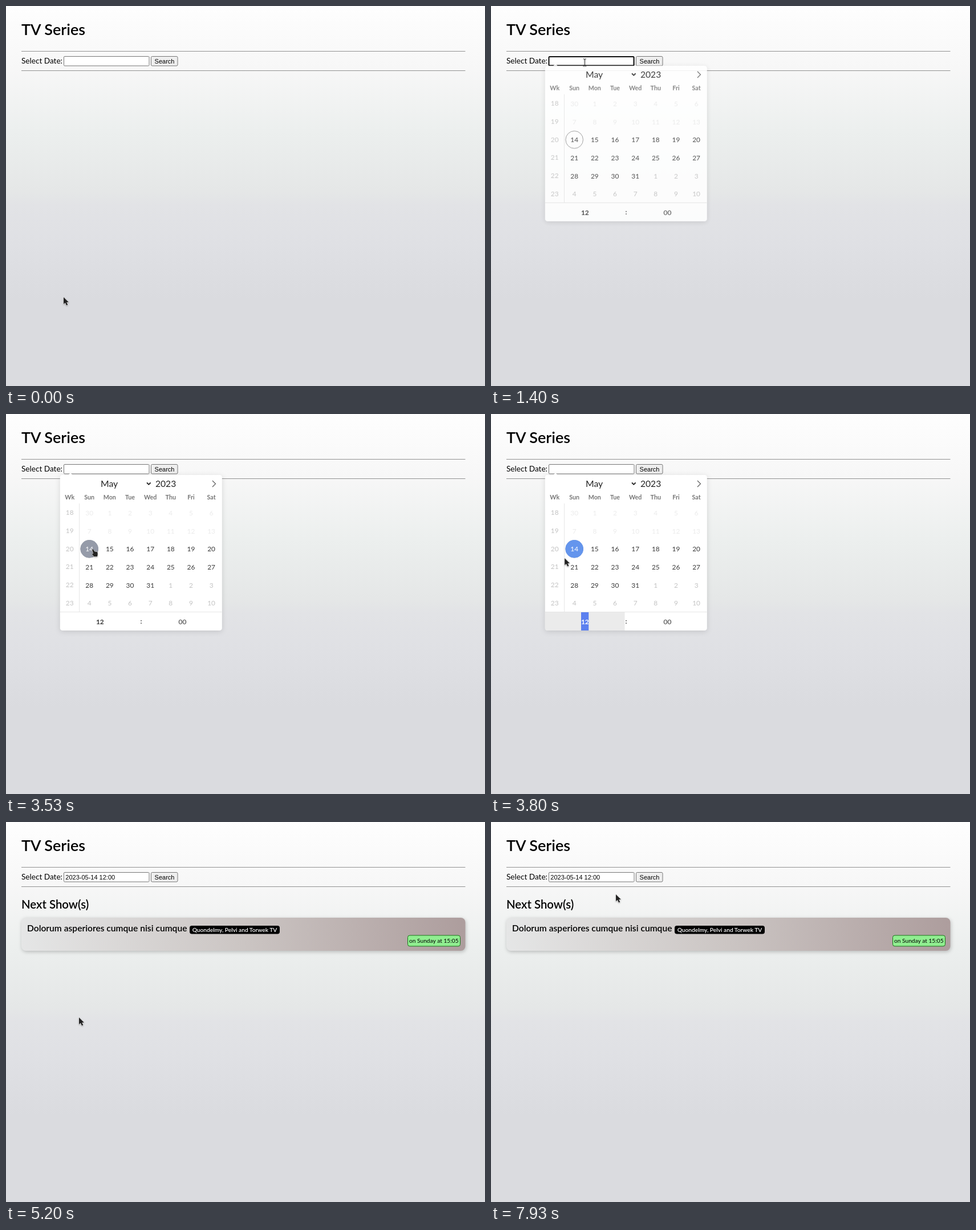
Recreate the animation shown at these times as an HTML page. Size 840 px wide and 667 px high, loop 8000 ms.

```html
<!DOCTYPE html>
<html lang="en">
<head>
<meta charset="utf-8">
<title>TV Series</title>
<style>
html, body { margin: 0; width: 100%; height: 100%; overflow: hidden; }
body {
  background: linear-gradient(#fefefe 0, #f7f7f7 110px, #ecefee 220px, #e5e7e7 325px,
    #e2e3e6 350px, #dfe0e4 420px, #dadbdf 515px, #dadbdf 667px);
}
svg { display: block; width: 840px; height: 667px; user-select: none; }
text { font-family: Lato, sans-serif; font-size: 11.9px; }
.semi { font-weight: 600; }
.mid { text-anchor: middle; }
.field { font-family: "Liberation Sans", Arial, sans-serif; font-size: 11px; }
.small { font-size: 10.2px; }
.week { fill: rgba(57, 57, 57, .3); }
.name { fill: rgba(0, 0, 0, .54); font-size: 10.7px; font-weight: 700; }
.day { fill: #393939; }
.off { fill: rgba(57, 57, 57, .1); }
.next { fill: rgba(57, 57, 57, .3); }
.card { filter: drop-shadow(1px 2px 3px rgba(0, 0, 0, .22)); }
.sheet { filter: drop-shadow(0 2px 5px rgba(0, 0, 0, .13)); }

/* 1% of the loop is 80 ms */
.anim { animation: 8s step-end infinite; }
#popup { animation-name: popup; }
#ring { animation-name: ring; }
#month { animation-name: month; }
#hover { animation-name: hover; }
#picked { animation-name: picked; }
#hour { animation-name: hour; }
#results { animation-name: results; }
#value { animation-name: value; }
#arrow { animation-name: arrow; }
#beam { animation-name: beam; }
#hand { animation-name: hand; }
#cursor { animation: move 8s linear infinite; }

@keyframes popup {
  0% { opacity: 0; transform: translateY(-17px); }
  16.3% { opacity: 0; transform: translateY(-17px); animation-timing-function: cubic-bezier(.23, 1, .32, 1); }
  20% { opacity: 1; transform: none; }
  59.125%, 100% { opacity: 0; transform: none; }
}
@keyframes ring { 0%, 25%, 100% { opacity: 0; } 16.3% { opacity: 1; } }
@keyframes month { 0%, 25%, 100% { opacity: 0; } 22% { opacity: 1; } }
@keyframes hover { 0%, 45%, 100% { opacity: 0; } 27.4% { opacity: 1; } }
@keyframes picked { 0%, 100% { opacity: 0; } 45% { opacity: 1; } }
@keyframes hour { 0%, 100% { opacity: 0; } 45.8% { opacity: 1; } }
@keyframes results { 0%, 100% { opacity: 0; } 48% { opacity: 1; } }
@keyframes value { 0%, 100% { opacity: 0; } 59.125% { opacity: 1; } }
@keyframes arrow { 0%, 25%, 46.5%, 100% { opacity: 1; } 11.6%, 26.6% { opacity: 0; } }
@keyframes beam { 0%, 20.8%, 100% { opacity: 0; } 11.6% { opacity: 1; } }
@keyframes hand { 0%, 25%, 46.5%, 100% { opacity: 0; } 20.8%, 26.6% { opacity: 1; } }
@keyframes move {
  0%, .9% { transform: translate(101px, 511px); }
  2.5% { transform: translate(80px, 390px); animation-timing-function: ease-out; }
  4.125%, 5.8% { transform: translate(98px, 244px); animation-timing-function: ease-out; }
  10% { transform: translate(165px, 112px); animation-timing-function: ease-out; }
  14.125%, 17% { transform: translate(164px, 97px); }
  24.125% { transform: translate(169px, 126px); }
  26.625% { transform: translate(155px, 226px); animation-timing-function: ease-out; }
  34.125%, 44.2% { transform: translate(151px, 237px); animation-timing-function: ease-in-out; }
  54.125%, 59.2% { transform: translate(57px, 306px); animation-timing-function: ease-in-out; }
  65%, 66% { transform: translate(128px, 343px); animation-timing-function: ease-in-out; }
  76.625% { transform: translate(711px, 266px); }
  80% { transform: translate(773px, 227px); animation-timing-function: ease-out; }
  87.5%, 90.8% { transform: translate(776px, 203px); animation-timing-function: ease-in-out; }
  99.125%, 100% { transform: translate(219px, 127px); }
}
</style>
</head>
<body>
<svg viewBox="0 0 840 667">
  <defs>
    <linearGradient id="warm">
      <stop stop-color="#e5e6e6"/>
      <stop offset=".5" stop-color="#cbc5c3"/>
      <stop offset="1" stop-color="#ad9d9d"/>
    </linearGradient>
  </defs>

  <text class="semi" x="27" y="50.5" style="font-size:27px">TV Series</text>
  <path d="M27 79.5H805.5M27 113.5H805.5" stroke="#929292"/>
  <text x="27" y="101" style="font-size:13.6px">Select Date:</text>
  <rect x="101.5" y="88.5" width="149.5" height="16.5" rx="1.5" fill="#fff" stroke="#767676"/>
  <text id="value" class="field anim" x="104.3" y="101">2023-05-14 12:00</text>
  <rect id="ring" class="anim" x="101.5" y="89" width="149" height="15.5" rx="1.5" fill="#fff" stroke="#101010" stroke-width="2"/>
  <rect x="254.5" y="88.5" width="46.5" height="16.5" rx="2" fill="#efefef" stroke="#767676"/>
  <text class="field mid" x="278" y="101">Search</text>

  <g id="results" class="anim">
    <text class="semi" x="27" y="152" style="font-size:20.4px">Next Show(s)</text>
    <rect class="card" x="27" y="168" width="778.5" height="58" rx="8" fill="url(#warm)"/>
    <text class="semi" x="37" y="192.3" style="font-size:15.6px">Dolorum asperiores cumque nisi cumque</text>
    <rect x="322" y="182" width="158" height="14.5" rx="4" fill="#000"/>
    <text class="small semi mid" x="401" y="192.7" fill="#fff">Quondelmy, Pelvi and Torwek TV</text>
    <rect x="704.5" y="199" width="92" height="19" rx="3.5" fill="#90ee90" stroke="#1c741c"/>
    <text class="small mid" x="750.3" y="212.2">on Sunday at 15:05</text>
  </g>

  <g id="popup" class="anim">
    <g class="sheet">
      <rect x="94.8" y="107" width="284" height="273" rx="4.3" fill="#fff"/>
      <path d="M109 107.5L113 103L117 107.5Z" fill="#fff"/>
    </g>
    <rect id="month" class="anim" x="161" y="112" width="96" height="20" fill="#f0f0f0"/>
    <g fill="#222" style="font-size:16px">
      <text x="166" y="127.5" style="font-size:15.8px">May</text>
      <text x="262" y="127.5" style="font-size:15.6px">2023</text>
    </g>
    <path d="M247 120.5L250.3 123.8L253.6 120.5" fill="none" stroke="#222" stroke-width="1.8"/>
    <path d="M362 117L367.5 122.5L362 128" fill="none" stroke="#555" stroke-width="1.1"/>
    <path d="M128.5 157V347.5M95 347.5H378.5" stroke="#e6e6e6"/>
    <g id="grid"></g>
    <circle cx="146.2" cy="236.8" r="15.3" fill="none" stroke="#959595"/>
    <g id="hover" class="anim">
      <circle cx="146.2" cy="236.8" r="15.8" fill="#959ba9"/>
      <text class="mid" x="146.2" y="241.2" fill="#fff">14</text>
    </g>
    <g id="picked" class="anim">
      <circle cx="146.2" cy="236.8" r="15.8" fill="#6495ed"/>
      <text class="mid" x="146.2" y="241.2" fill="#fff">14</text>
    </g>
    <text class="mid day" x="164.8" y="368.6" font-weight="700">12</text>
    <text class="mid day" x="237" y="368" font-weight="700">:</text>
    <text class="mid day" x="309.5" y="368.6">00</text>
    <g id="hour" class="anim">
      <path d="M94.8 348H234.5V380H99Q94.8 380 94.8 375.7Z" fill="#ebebeb"/>
      <rect x="158" y="348" width="13.3" height="32" fill="#5c80ef"/>
      <text class="mid" x="164.8" y="368.6" fill="#fff" font-weight="700">12</text>
    </g>
  </g>

  <g id="cursor" style="filter:drop-shadow(0 1px 1px rgba(0,0,0,.3))">
    <path id="arrow" class="anim" d="M0 0V12.3L2.8 9.8L5 14.6L7.3 13.6L5.2 9H9Z" fill="#222" stroke="#fff" stroke-width="1" paint-order="stroke"/>
    <path id="beam" class="anim" d="M-2.5 -6.5Q0 -6.5 0 -4.5Q0 -6.5 2.5 -6.5M0 -4.5V4.5M-2.5 6.5Q0 6.5 0 4.5Q0 6.5 2.5 6.5" fill="none" stroke="#222"/>
    <path id="hand" class="anim" d="M0 1.5Q.6 -.4 2.2 .8L4.2 4.3L8.3 5Q9.7 5.4 9.7 7V10.5L9 13.3H3.2L.2 9.2Q-.5 7.6 2 8Z" fill="#222" stroke="#fff" stroke-width="1" paint-order="stroke"/>
  </g>
</svg>
<script>
const grid = document.getElementById('grid');
const colX = c => 146.2 + c * 35.65;
const rowY = r => 177.9 + r * 31.65;

function label(x, y, str, cls) {
  const t = document.createElementNS('http://www.w3.org/2000/svg', 'text');
  t.setAttribute('x', x);
  t.setAttribute('y', y);
  t.setAttribute('class', 'mid ' + cls);
  t.textContent = str;
  grid.append(t);
}

label(111.7, 149.6, 'Wk', 'name');
['Sun', 'Mon', 'Tue', 'Wed', 'Thu', 'Fri', 'Sat'].forEach((d, c) => label(colX(c), 149.6, d, 'name'));

for (let r = 0; r < 6; r++) {
  label(111.7, rowY(r) - .5, 18 + r, 'week');
  for (let c = 0; c < 7; c++) {
    const n = r * 7 + c;
    const cls = n < 14 ? 'off' : n > 31 ? 'next' : 'day';
    label(colX(c), rowY(r), n === 0 ? 30 : n > 31 ? n - 31 : n, cls);
  }
}
</script>
</body>
</html>
```
